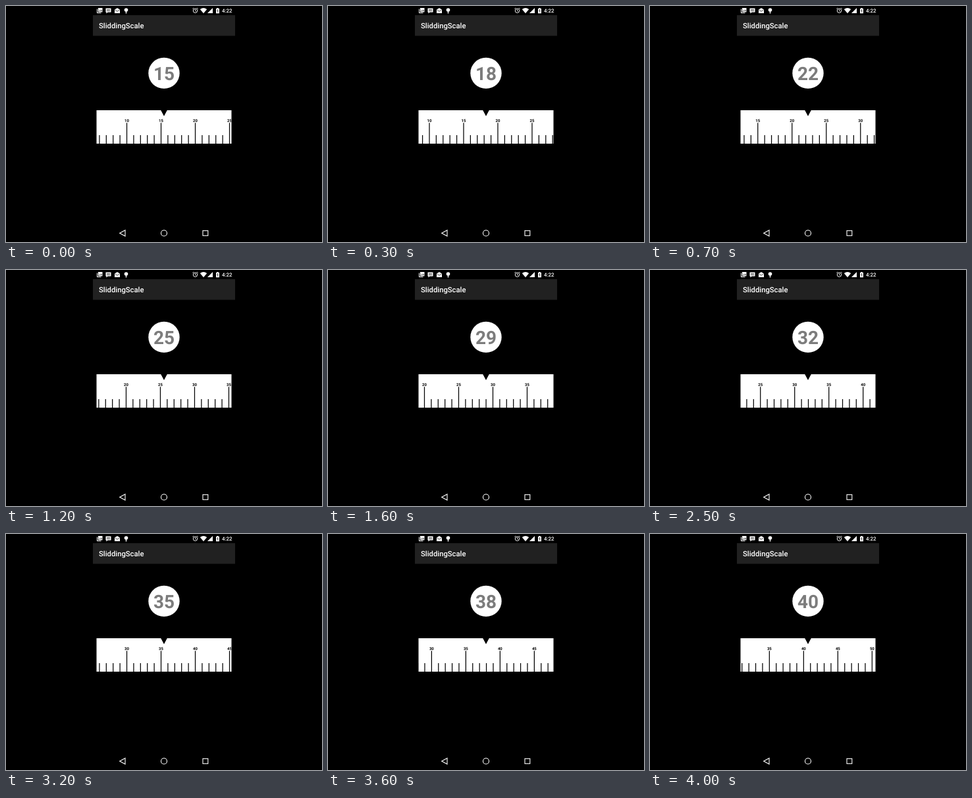
Recreate the animation shown at these times as an HTML page. Size 480 px wide and 360 px high, loop 4100 ms.

```html
<!DOCTYPE html>
<html lang="en">
<head>
<meta charset="utf-8">
<title>SliddingScale</title>
<style>
  html, body { margin: 0; width: 100%; height: 100%; overflow: hidden; background: #000; }
  svg { display: block; width: 480px; height: 360px; font-family: Roboto, sans-serif; text-rendering: geometricPrecision; }
  .middle { text-anchor: middle; font-weight: 700; }
</style>
</head>
<body>
<svg viewBox="0 0 480 360">
  <clipPath id="window"><rect x="137.5" y="159" width="205" height="51"/></clipPath>
  <rect width="480" height="360"/>

  <!-- status bar -->
  <g fill="#fff">
    <path d="M138 4.5h1v5.5h5.5v1H138zM140 3h6.5v6.2H140z"/>
    <path d="M151.5 3.5h8v6h-5l-2 2v-2h-1z"/>
    <path d="M165 5.5l4-2.5 4 2.5V11h-8z"/>
    <circle cx="182.5" cy="6" r="2.8"/>
    <path d="M181.8 8h1.4v3.5h-1.4z"/>
    <path d="M294.8 5q5.2-4 10.4 0L300 11.3z"/>
    <path d="M306 11l8-8v8z"/>
    <path d="M319 4h1.3V3h2.4v1h1.3v7.2h-5z"/>
    <text x="327.9" y="10.2" font-size="7.9" font-weight="500">4:22</text>
  </g>
  <g fill="none" stroke="#000" stroke-width=".7">
    <path d="M141.3 8l1.4-1.6 1 1 1-1.4 1.2 2M153 5.6h5M153 7.4h5M165.6 6l3.4 2.2 3.4-2.2M321.8 5l-1 2.3h1.4l-1 2.4"/>
  </g>
  <g fill="none" stroke="#fff">
    <circle cx="287.5" cy="7.2" r="3.2"/>
    <path d="M287.5 5.2v2.2l1.4.9M283.4 4.4l1.8-1.5M291.6 4.4l-1.8-1.5" stroke-width=".9"/>
  </g>

  <!-- title bar -->
  <rect x="132" y="14" width="216" height="31.5" fill="#212121"/>
  <text x="141" y="34" font-size="11.25" font-weight="500" fill="#fff">SliddingScale</text>

  <!-- reading -->
  <circle cx="240" cy="102.4" r="23.7" fill="#fff"/>
  <text id="reading" class="middle" x="240" y="113" font-size="28" fill="#7c7c7c"></text>

  <!-- ruler -->
  <g clip-path="url(#window)">
    <rect x="137" y="159" width="206" height="51" fill="#fff"/>
    <g id="ruler"></g>
    <path d="M235.2 159h9.6l-4.8 9z"/>
  </g>

  <!-- navigation bar -->
  <g fill="none" stroke="#fff" stroke-width="1.1">
    <path d="M181 342v9l-8.3-4.5z"/>
    <circle cx="240" cy="346.5" r="4.5"/>
    <rect x="299" y="342.7" width="7.8" height="7.6"/>
  </g>
</svg>
<script>
const LOOP = 4100, STEP = 100, PITCH = 10.4, CENTER = 240;
const ruler = document.getElementById('ruler');
const reading = document.getElementById('reading');

let marks = '', labels = '';
for (let n = 0; n <= 60; n++) {
  const x = n * PITCH, major = n % 5 === 0;
  marks += `M${x} ${major ? 178.3 : 197}V210`;
  if (major) labels += `<text class="middle" x="${x}" y="177" font-size="6">${n}</text>`;
}
ruler.innerHTML = `<path d="${marks}" stroke="#000" stroke-width="1.25"/>${labels}`;

// Drag path: time in ms, value, speed in units per 100 ms
const keys = [
  [0, 15.43, .9], [700, 22.33, 1.03], [1000, 25.3, .8], [1001, 25.3, 0], [1100, 25.3, 0],
  [1900, 30.7, 0], [2200, 30.7, 0], [2500, 31.95, .5], [3200, 35.43, .56], [4000, 40.64, .65]
];

function valueAt(time) {
  const i = Math.max(1, keys.findIndex(key => key[0] >= time));
  const [t0, v0, s0] = keys[i - 1], [t1, v1, s1] = keys[i];
  const span = t1 - t0, u = (time - t0) / span, w = 1 - u;
  return v0 + (v1 - v0) * u * u * (3 - 2 * u)
    + (s0 * u * w * w - s1 * u * u * w) * span / 100;
}

function draw() {
  const time = Math.floor(performance.now() % LOOP / STEP) * STEP;
  const value = valueAt(time);
  ruler.setAttribute('transform', `translate(${CENTER - value * PITCH} 0)`);
  reading.textContent = Math.floor(value + .33);
  requestAnimationFrame(draw);
}
draw();
</script>
</body>
</html>
```
